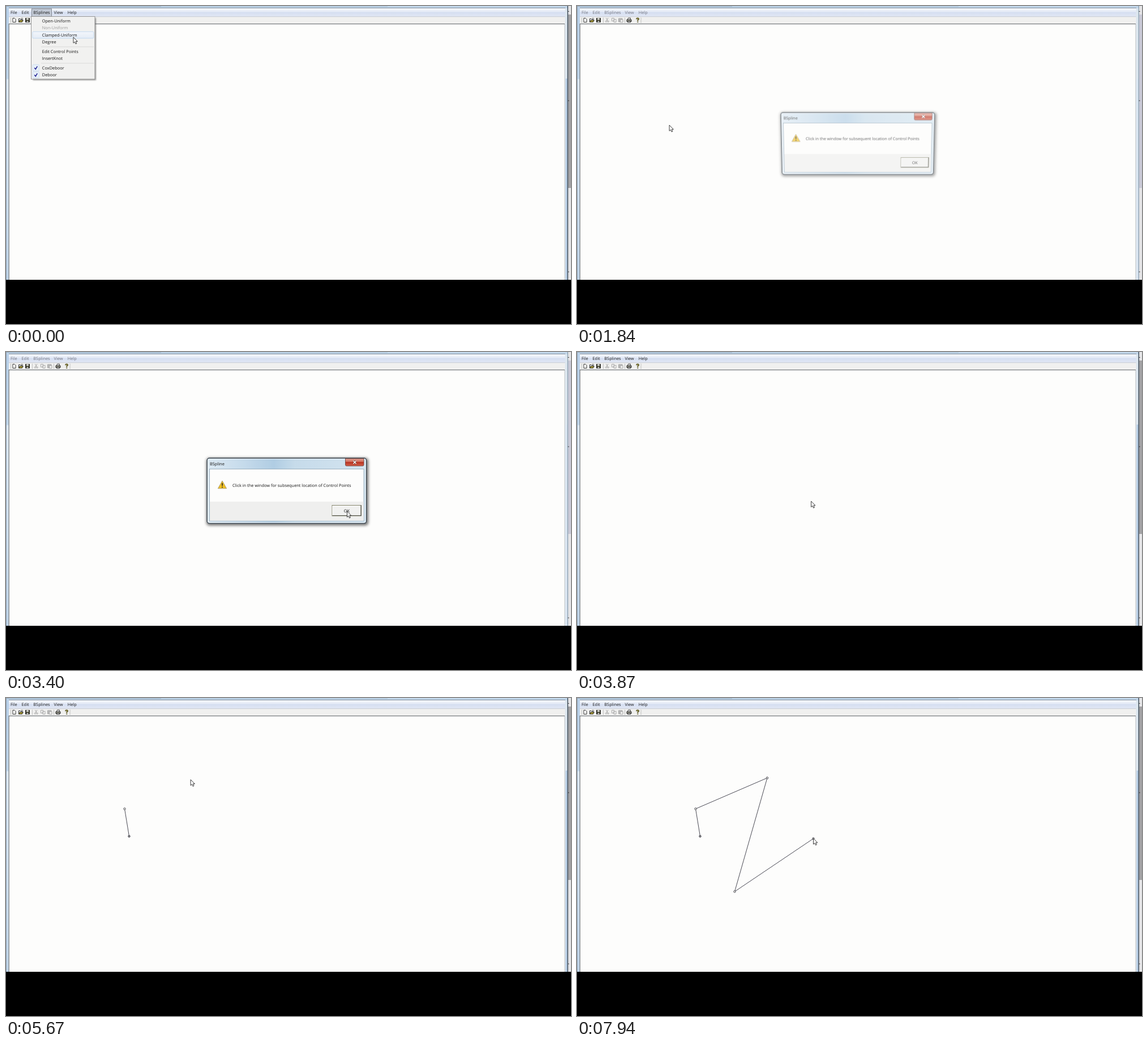
Write an HTML page that moves like this. It is 998 px wide and 561 px high and loops after 8 s.

```html
<!DOCTYPE html>
<html lang="en">
<head>
<meta charset="utf-8">
<title>BSpline</title>
<style>
html, body { margin: 0; width: 100%; height: 100%; overflow: hidden; background: #000; }
svg { position: absolute; left: 0; top: 0; width: 998px; height: 561px; }
text { font: 7.4px "Open Sans", "Noto Sans", sans-serif; text-rendering: geometricPrecision; fill: #161616; }
#bar text { fill: #1c1c1c; }
.idle #bar text { fill: #747680; }
.idle .thumb { fill: #c9c9d6; }
.idle .edge { fill: #8fa3b4; }
.idle .frame { fill: #dbe7f3; }
#dialog { transform-origin: 496px 245px; }
.shadow { filter: blur(2.5px); }
</style>
</head>
<body>
<svg id="app" viewBox="0 0 998 561">
  <defs>
    <linearGradient id="barFill" x2="0" y2="1">
      <stop offset="0" stop-color="#f6f8fc"/><stop offset=".4" stop-color="#e4eaf6"/>
      <stop offset=".5" stop-color="#d5def1"/><stop offset="1" stop-color="#e2e8f5"/>
    </linearGradient>
    <linearGradient id="side" x2="0" y2="1">
      <stop offset="0" stop-color="#b9d1ea"/><stop offset=".26" stop-color="#c2d8ed"/>
      <stop offset=".265" stop-color="#e0ebf6"/><stop offset=".7" stop-color="#cfe0f0"/>
      <stop offset="1" stop-color="#c0d5ea"/>
    </linearGradient>
    <linearGradient id="hover" x2="0" y2="1">
      <stop offset="0" stop-color="#f3f6fb"/><stop offset="1" stop-color="#e4ecf6"/>
    </linearGradient>
  </defs>
  <rect width="998" height="483" fill="#fdfdfc"/>
  <rect width="992" height="4" fill="#c3d8ec"/>
  <rect width="274" height="1.5" fill="#9fb6cc"/>
  <rect x="274" width="400" height="1.5" fill="#b4cbe0"/>
  <rect y="3" x="4" width="984" height="1" fill="#7d8b9a"/>
  <rect y="3" width="5" height="480" fill="url(#side)"/>
  <rect width="1" height="483" fill="#8c9fb2"/>
  <rect x="5" y="4" width="983" height="15" fill="url(#barFill)"/>
  <rect x="5" y="19" width="983" height="13" fill="#f0f0ef"/>
  <rect x="5" y="18.5" width="983" height=".7" fill="#b9bdc6"/>
  <rect x="5" y="31" width="982" height="1.2" fill="#74787c"/>
  <rect x="4.6" y="31" width="1.2" height="452" fill="#74787c"/>
  <rect x="986.5" y="32" width="1" height="451" fill="#a9adb0"/>
  <rect x="987.5" y="4" width="4" height="479" fill="#dde7f0"/>
  <rect class="frame" x="988.5" y="128" width="3" height="355" fill="#b4cbe4"/>
  <rect class="edge" x="991.5" width="1.6" height="483" fill="#3e4c5a"/>
  <rect x="993" width="5" height="483" fill="#e4e4e6"/>
  <rect class="thumb" x="993" y="15" width="5" height="306" fill="#a2a2a4"/>
  <path d="M992.5 9.500h2M992.5 167h2M992.5 469h2" stroke="#333"/>
  <g id="bar"></g>
  <g id="tools" fill="none" stroke="#222" stroke-width=".9">
    <path d="M12 21.500h3l2 2v5h-5z" fill="#fff"/>
    <path d="M22.500 28v-5.500h2.500l1 1h3v1.500"/>
    <path d="M22.500 28.300l1.800-3.300h6l-1.800 3.300z" fill="#a99a2c"/>
    <path d="M26.500 22q2-1.500 3.500.5" stroke-width=".7"/>
    <path d="M34.500 21.500h7v7h-7z" fill="#3a3a28"/>
    <path d="M36 21.500h4v2.800h-4z" fill="#e8e8e0" stroke="none"/>
    <path d="M36.500 26.300h3v2h-3z" fill="#ddd" stroke="none"/>
    <g stroke="#a4a4a4">
      <path d="M51.500 21l2.600 5M55 21l-2.600 5"/><circle cx="51.500" cy="27.300" r="1.200"/><circle cx="55" cy="27.300" r="1.200"/>
      <path d="M61.500 21.500h4v5h-4zM65 23.500h4v5h-4z" fill="#eee"/>
      <path d="M73.500 22h6.500v6h-6.500z" fill="#bbb"/><path d="M76.500 24h4.500v4.800h-4.500z" fill="#eee"/>
    </g>
    <path d="M89.500 24l1-2.800h4l-.7 2.800" fill="#fff"/>
    <path d="M88 24h8v3.500h-8z" fill="#8c8c80"/><path d="M89.500 27h5v1.800h-5z" fill="#fff"/>
    <path d="M105.300 23.200q0-1.700 1.800-1.700t1.800 1.500q0 1-1.600 1.800v1.400M107.300 27.500v1.400" stroke="#222" stroke-width="2"/>
    <path d="M105.300 23.200q0-1.700 1.800-1.700t1.800 1.500q0 1-1.600 1.800v1.400M107.300 27.700v1" stroke="#c9bd1e" stroke-width=".8"/>
    <path d="M8.500 20.500v9.500M46.500 20.500v9.500M84.500 20.500v9.500M113 20.500v9.500" stroke="#b5b5b5" stroke-width=".8"/>
  </g>
  <g id="curve" stroke="#2a2a36" stroke-width=".85"></g>
  <g id="menu">
    <rect x="45.500" y="5" width="35" height="13.500" fill="#c3cad6" stroke="#7c828c" stroke-width=".9"/>
    <text x="48.300" y="13.700">BSplines</text>
    <rect x="47.500" y="21" width="111.500" height="110" fill="#555" opacity=".6" style="filter:blur(.8px)"/>
    <rect x="44.500" y="18.500" width="112.500" height="110.500" fill="#f1f1f0" stroke="#8f8f8f" stroke-width=".9"/>
    <rect x="46.800" y="45.300" width="108" height="11.600" rx="1.500" fill="url(#hover)" stroke="#b9d3ee" stroke-width=".8"/>
    <path d="M62 72h93M62 101h93" stroke="#d6d6d6" stroke-width=".9"/>
  </g>
</svg>
<svg id="dialog" viewBox="0 0 998 561">
  <defs>
    <linearGradient id="glass">
      <stop offset="0" stop-color="#dce9f3"/><stop offset=".25" stop-color="#c3d9ea"/>
      <stop offset=".42" stop-color="#b0cde3"/><stop offset=".55" stop-color="#c6dbea"/>
      <stop offset="1" stop-color="#d3e4f0"/>
    </linearGradient>
    <linearGradient id="red" x2="0" y2="1">
      <stop offset="0" stop-color="#e4a598"/><stop offset=".45" stop-color="#cf6a58"/>
      <stop offset=".5" stop-color="#b93422"/><stop offset="1" stop-color="#d2604a"/>
    </linearGradient>
  </defs>
  <rect class="shadow" x="354" y="187" width="286" height="119" rx="5" opacity=".55"/>
  <rect x="355.200" y="187.200" width="281.300" height="115" rx="4" fill="url(#glass)" stroke="#36424c" stroke-width="1.400"/>
  <rect x="356.500" y="188.500" width="278.700" height="112.500" rx="3" fill="none" stroke="#f2f8fc" stroke-width=".9"/>
  <text x="360" y="200">BSpline</text>
  <path d="M599.500 188h32.500v11q0 2-2 2h-28.500q-2 0-2-2z" fill="url(#red)" stroke="#6d3a36" stroke-width=".8"/>
  <path d="M613.500 192l5 5M618.500 192l-5 5" stroke="#5a2a26" stroke-width="2.800"/>
  <path d="M613.500 192l5 5M618.500 192l-5 5" stroke="#fff" stroke-width="1.700"/>
  <rect x="359.500" y="206.500" width="272.500" height="91.500" fill="#fdfdfc" stroke="#8da3b3" stroke-width=".8"/>
  <rect x="360" y="264" width="271.500" height="33.500" fill="#efefee"/>
  <path d="M382 227.300l7.600 13.500h-15.200z" fill="#f0c022" stroke="#a99a70" stroke-width=".9" stroke-linejoin="round"/>
  <path d="M382 231.300v4.700M382 237.500v1.700" stroke="#222" stroke-width="1.600"/>
  <text x="400" y="238.400">Click in the window for subsequent location of Control Points</text>
  <rect x="576" y="270.500" width="51.500" height="18.500" fill="#f1f1f0" stroke="#77775c" stroke-width=".9"/>
  <path d="M577 288v-16.500h49.500" fill="none" stroke="#fff"/>
  <path d="M576.500 288.500h50.500v-18" fill="none" stroke="#55554c" stroke-width="1.200"/>
  <text x="601.800" y="282.500" text-anchor="middle">OK</text>
</svg>
<svg viewBox="0 0 998 561">
  <path id="cursor" d="M0 0V10.300L2.400 8.200L4 11.900L5.800 11.100L4.300 7.500H7.300Z" fill="#fff" stroke="#1a1a1a" stroke-width=".85"/>
  <rect y="483" width="998" height="78"/>
</svg>
<script>
const LOOP = 8000, MENU_CLOSE = 1400, OPEN = 1740, CLOSE = 3570;
const $ = id => document.getElementById(id);

function add(parent, tag, attrs, label) {
  const el = document.createElementNS('http://www.w3.org/2000/svg', tag);
  for (const name in attrs) el.setAttribute(name, attrs[name]);
  if (label) el.textContent = label;
  parent.append(el);
  return el;
}

[['File', 8], ['Edit', 27.5], ['BSplines', 48.3], ['View', 84.5], ['Help', 108.7]]
  .forEach(([label, x]) => add($('bar'), 'text', { x, y: 13.7 }, label));

[['Open-Uniform', 26], ['Non-Uniform', 38.5], ['Clamped-Uniform', 51], ['Degree', 63.5],
 ['Edit Control Points', 80], ['InsertKnot', 92.5], ['CoxDeboor', 109], ['Deboor', 121.5]]
  .forEach(([label, y], i) => {
    const item = add($('menu'), 'text', { x: 63.8, y: y + 2.7 }, label);
    if (i === 1) item.style.fill = '#9a9a9a';
    if (i < 6) return;
    add($('menu'), 'rect', { x: 47, y: y - 5.7, width: 11.5, height: 11.4, rx: 1.5,
      fill: '#e6eff8', stroke: '#c5d9ee', 'stroke-width': .7 });
    add($('menu'), 'path', { d: `M50.300 ${y}l2 2.600 3-5.200`, fill: 'none',
      stroke: '#15158c', 'stroke-width': 1.4 });
  });

// Control points: click time, x, y
const points = [[4380, 217.5, 244], [5210, 209.5, 195.5], [5980, 336, 141],
                [6780, 278.5, 341.5], [7910, 417.5, 248]];
const parts = [];
points.forEach(([at, x, y], i) => {
  if (!i) return;
  const [, x1, y1] = points[i - 1];
  parts.push([at, add($('curve'), 'line', { x1, y1, x2: x, y2: y })]);
});
points.forEach(([at, cx, cy], i) => {
  parts.push([at, add($('curve'), 'circle', { cx, cy, r: 1.7, fill: i ? '#f4f4ec' : '#999' })]);
});

// Cursor path: time, x, y
const path = [
  [0, 119, 55], [840, 119, 55], [1140, 118, 53], [1370, 118, 53], [1840, 163, 210],
  [2170, 186, 236], [2440, 186, 236], [2740, 329, 243], [3240, 599, 279], [3300, 599, 279],
  [3400, 602.5, 281], [3600, 602.5, 281], [4070, 262, 248.5], [4300, 217.5, 243.5],
  [4570, 217.5, 243.5], [5000, 209.5, 195], [5440, 209.5, 195], [5670, 326, 144],
  [5800, 336, 140.5], [6300, 336, 140.5], [6600, 278.5, 341], [6880, 278.5, 341],
  [7540, 414, 250], [7630, 414, 250], [7670, 417.5, 247.7], [LOOP, 417.5, 247.7]
];

const slope = (i, axis) => (path[i + 1][axis] - path[i][axis]) / (path[i + 1][0] - path[i][0]);

// Harmonic-mean tangents: smooth through moving keys, at rest on holds
function tangent(i, axis) {
  if (!i || i === path.length - 1) return 0;
  const a = slope(i - 1, axis), b = slope(i, axis);
  return a * b > 0 ? 2 * a * b / (a + b) : 0;
}

function cursorAt(t, axis) {
  const i = path.findIndex((key, n) => n < path.length - 1 && t < path[n + 1][0]);
  const a = path[i], b = path[i + 1], span = b[0] - a[0];
  const u = (t - a[0]) / span, v = 1 - u;
  return v * v * (1 + 2 * u) * a[axis] + u * u * (1 + 2 * v) * b[axis]
    + span * u * v * (v * tangent(i, axis) - u * tangent(i + 1, axis));
}

const clamp = n => Math.max(0, Math.min(1, n));
const show = (el, on) => { el.style.visibility = on ? 'visible' : 'hidden'; };

function poseDialog(t) {
  const k = t < CLOSE ? (1 - clamp((t - OPEN) / 250)) ** 2 : clamp((t - CLOSE) / 180);
  const style = $('dialog').style;
  style.opacity = 1 - k;
  style.transform = k
    ? `perspective(900px) translateY(${-5 * k}px) scale(${1 - .12 * k}) rotateX(${-23 * k}deg)`
    : 'none';
  show($('dialog'), k < 1);
}

function render(now) {
  const t = Math.max(0, now) % LOOP;
  show($('menu'), t < MENU_CLOSE);
  $('app').classList.toggle('idle', t >= OPEN && t < CLOSE);
  poseDialog(t);
  parts.forEach(([at, el]) => show(el, t >= at));
  $('cursor').setAttribute('transform', `translate(${cursorAt(t, 1)} ${cursorAt(t, 2)})`);
  requestAnimationFrame(render);
}
render(performance.now());
</script>
</body>
</html>
```
